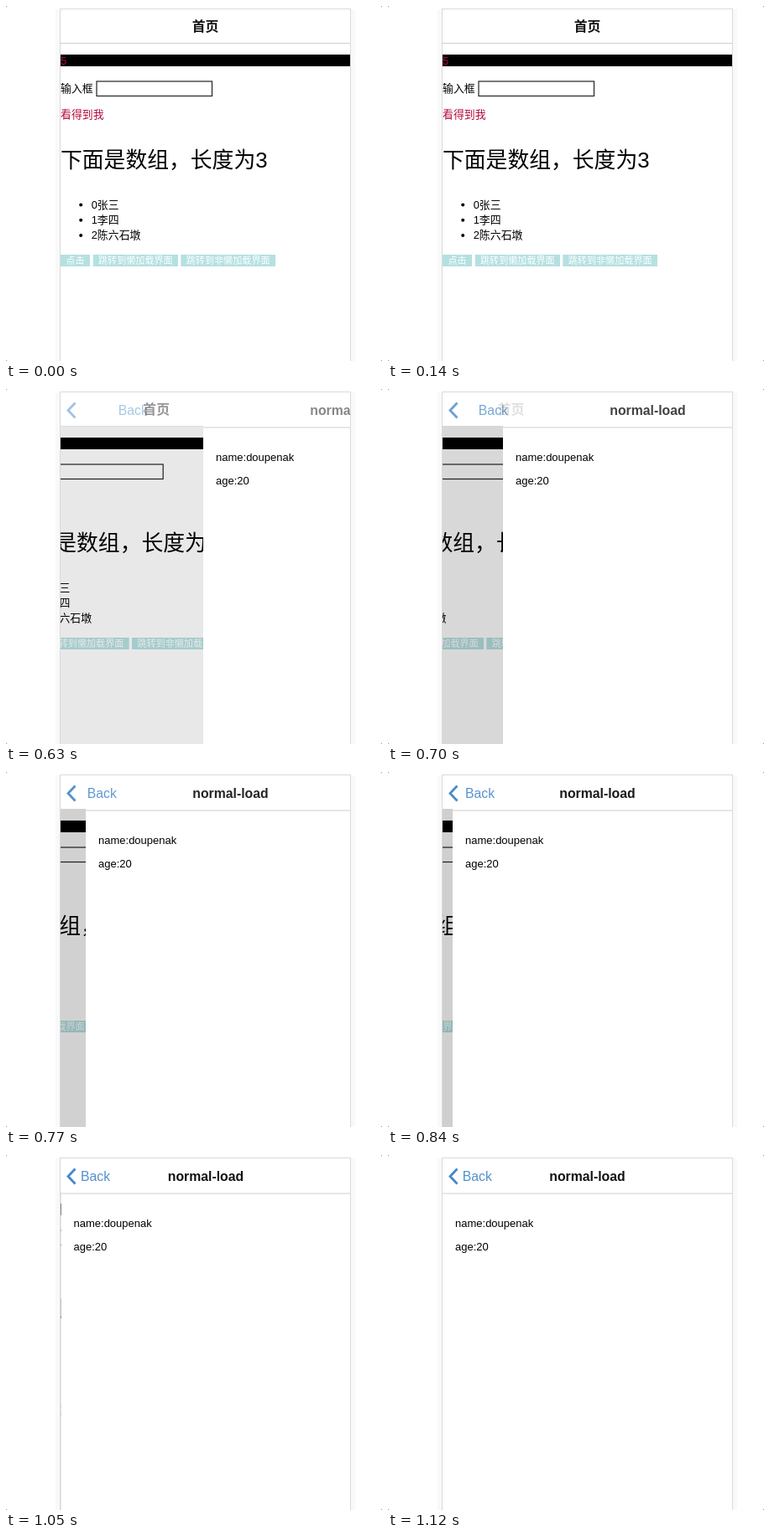
Write an HTML page that moves like this. It is 448 by 424 pixels and loops after 1.89 s.

```html
<!DOCTYPE html>
<html lang="zh-CN">
<head>
<meta charset="utf-8">
<title>Page push</title>
<style>
  html, body { margin: 0; width: 100%; height: 100%; overflow: hidden; background: #777; }
  svg { display: block; width: 448px; height: 424px; background: #fff; border-radius: 2px; }
  text { font: 13px "Liberation Sans", "Noto Sans CJK SC", "Noto Sans CJK", sans-serif; fill: #000; }
  .cjk { font-size: 12.9px; }
  .h1 { font-size: 25.8px; }
  .red { fill: #b0083a; }
  .bar { font-size: 15.8px; }
  .title { font-weight: 700; text-anchor: middle; fill: #111; }
  .btn rect { fill: #b5e0e1; }
  .btn text { font-size: 11.1px; text-anchor: middle; fill: #fff; }
  .blue { fill: #5290cd; }
</style>
</head>
<body>
<svg viewBox="0 0 448 424">
  <defs>
    <clipPath id="card"><rect x="65" y="4" width="345" height="420"/></clipPath>
  </defs>
  <rect x="59" y="4" width="357" height="420" fill="#f9f9f9"/>
  <rect x="64.5" y="3.5" width="346" height="430" fill="#fff" stroke="#dadada"/>

  <g clip-path="url(#card)">
    <g id="home">
      <rect x="65" y="58" width="345" height="14"/>
      <text class="red" x="65" y="69.7">5</text>
      <text class="cjk" x="65" y="103.4">输入框</text>
      <rect x="108" y="90" width="137.5" height="17.5" fill="#fff" stroke="#222" stroke-width="1.2"/>
      <text class="cjk red" x="65" y="134.3">看得到我</text>
      <text class="h1" x="65" y="192.8">下面是数组，长度为3</text>
      <g id="list"></g>
      <g id="buttons"></g>
    </g>
    <rect id="dim" x="65" y="44" width="345" height="380" opacity="0"/>
    <rect x="65" y="4" width="345" height="40" fill="#fff"/>
    <rect id="rule" x="65" y="44" width="345" height="1" fill="#cfcfcf"/>

    <g id="detail">
      <rect x="65" y="44" width="346" height="380" fill="#fff"/>
      <rect x="65" y="45.5" width="346" height="1" fill="#d0d0d0"/>
      <text x="80" y="86.3">name:doupenak</text>
      <text x="80" y="113.7">age:20</text>
    </g>

    <path id="arrow" d="M82.5 16.5 L74 25.5 L82.5 34.5" fill="none" stroke="#4688ca" stroke-width="2.8"/>
    <text id="back" class="bar blue" x="88.8" y="31">Back</text>
    <text id="homeTitle" class="bar title" x="237.5" y="30.3">首页</text>
    <text id="detailTitle" class="bar title" x="237.5" y="31">normal-load</text>
  </g>
</svg>
<script>
  const LOOP = 1890, START = 560, STEP = 70, WIDTH = 345;
  // distance of the incoming page from rest, one entry per step
  const OFFSETS = [300, 170, 72, 30, 12, 4, 1, 0.5, 0];
  const $ = id => document.getElementById(id);

  $('list').innerHTML = ['张三', '李四', '陈六石墩'].map((name, i) => {
    const y = 237 + i * 18.2;
    return `<circle cx="89.2" cy="${y + 0.6}" r="2"/><text class="cjk" x="101.7" y="${y + 4.7}">${i}${name}</text>`;
  }).join('');

  $('buttons').innerHTML = [
    [65, 35, '点击'],
    [103.7, 101.3, '跳转到懒加载界面'],
    [208.3, 112.7, '跳转到非懒加载界面']
  ].map(([x, w, label]) =>
    `<g class="btn"><rect x="${x}" y="297" width="${w}" height="14"/>` +
    `<text x="${x + w / 2}" y="308">${label}</text></g>`).join('');

  const move = (id, x) => $(id).setAttribute('transform', `translate(${x.toFixed(2)} 0)`);
  const fade = (id, a) => $(id).setAttribute('opacity', Math.max(0, a).toFixed(3));

  function draw(t) {
    const step = Math.floor((t - START) / STEP);
    const off = step < 0 ? WIDTH : OFFSETS[Math.min(step, OFFSETS.length - 1)];
    const p = 1 - off / WIDTH;
    const drift = (off - WIDTH) / 3;

    move('home', drift);
    move('homeTitle', drift);
    move('detail', off);
    move('detailTitle', off);
    move('back', off * 0.264);

    fade('dim', 0.22 * (p - 0.1));
    fade('homeTitle', 1 - 1.1 * p);
    fade('detailTitle', p);
    fade('back', p);
    fade('arrow', p);
    fade('rule', 1 - p);
  }

  let origin = null;
  function tick(now) {
    if (origin === null) origin = now;
    draw((now - origin) % LOOP);
    requestAnimationFrame(tick);
  }
  draw(0);
  requestAnimationFrame(tick);
</script>
</body>
</html>
```
